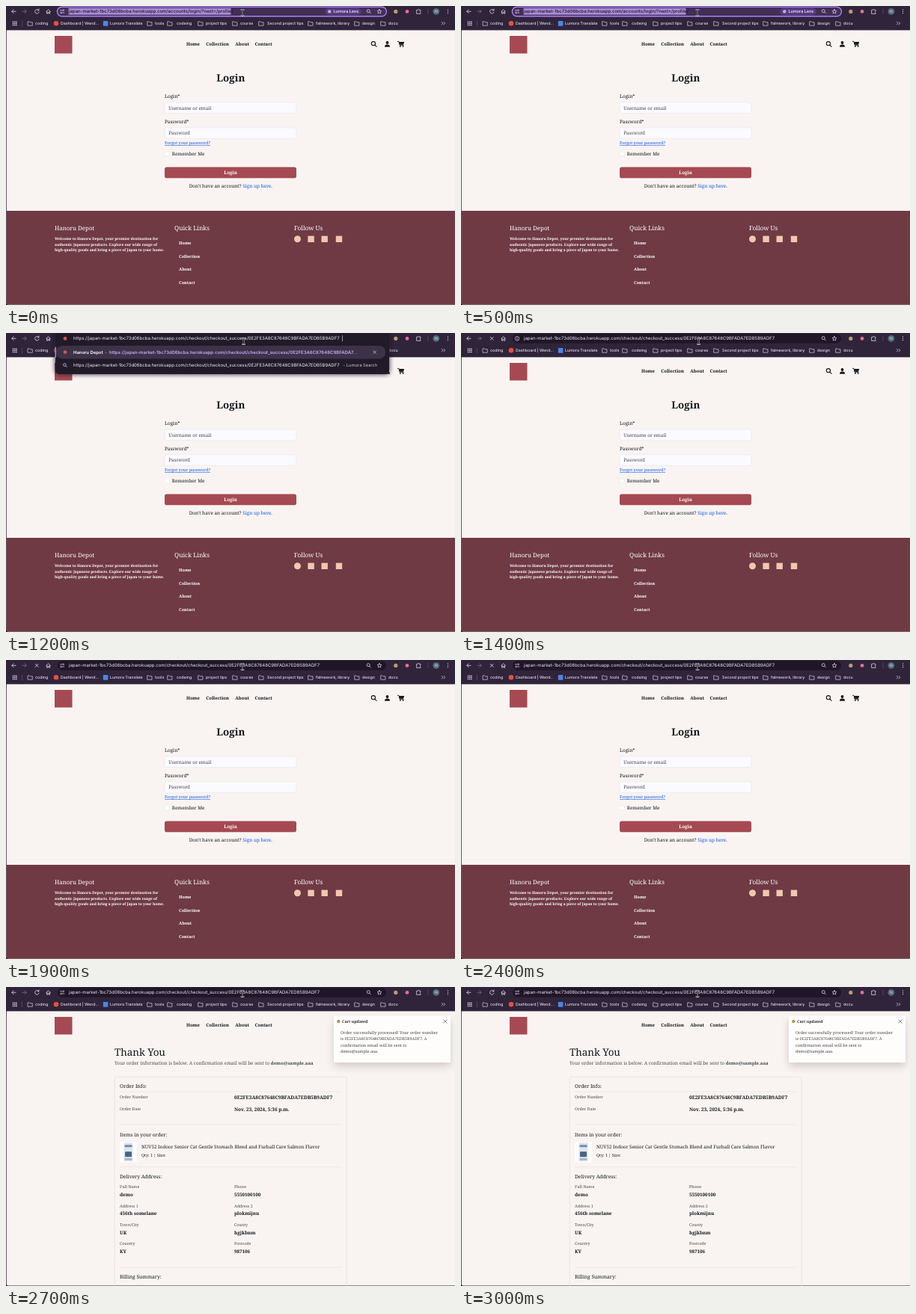
Animation, 600 px wide and 400 px high, one loop 3100 ms. Source, as an HTML page:

```html
<!DOCTYPE html>
<html lang="en">
<head>
<meta charset="utf-8">
<title>Shop checkout</title>
<style>
html, body { margin: 0; width: 100%; height: 100%; overflow: hidden; background: #1b1522; }
svg { display: block; width: 600px; height: 400px; text-rendering: geometricPrecision; }
.ui { font-family: Inter, Roboto, sans-serif; }
.serif { font-family: "Noto Serif", "Liberation Serif", serif; }
</style>
</head>
<body>
<svg id="stage" viewBox="0 0 600 400"></svg>
<script>
const LOOP = 3100;
const PASTE = 700, LOAD = 1400, SECURE = 1900, ARRIVE = 2500, DONE = 2700;

const SHOP = "Hanoru Depot";
const ORDER = "0E2FE3A8C87648C9BFADA7EDB5B9ADF7";
const HOST = "japan-market-1bc73d06bcba.herokuapp.com";
const LOGIN_URL = HOST + "/accounts/login/?next=/profile/";
const ORDER_URL = HOST + "/checkout/checkout_success/" + ORDER;
const MAIL = "demo@sample.aaa";

const INK = "#15171a", GREY = "#47484c", PALE = "#e4dcea", PAGE = "#f9f4f2";
const RED = "#a54a52", WINE = "#6f3a44", PEACH = "#efc8ae", LINE = "#e3dddb", LINK = "#0f58ea";

// Markup helpers
const text = (x, y, size, str, fill = INK, more = "") =>
  `<text x="${x}" y="${y}" font-size="${size}" fill="${fill}" ${more}>${str}</text>`;
const rect = (x, y, w, h, fill, r = 0, more = "") =>
  `<rect x="${x}" y="${y}" width="${w}" height="${h}" rx="${r}" fill="${fill}" ${more}/>`;
const dot = (x, y, r, fill, more = "") =>
  `<circle cx="${x}" cy="${y}" r="${r}" fill="${fill}" ${more}/>`;
const stroke = (d, color, w = 0.8, more = "") =>
  `<path d="${d}" fill="none" stroke="${color}" stroke-width="${w}" stroke-linecap="round" stroke-linejoin="round" ${more}/>`;
const shape = (d, fill) => `<path d="${d}" fill="${fill}"/>`;
const rule = (x1, x2, y) => stroke(`M${x1} ${y}H${x2}`, LINE, 0.5);
const group = (id, body, more = "") => `<g id="${id}" ${more}>${body}</g>`;
const BOLD = ' font-weight="700"', SEMI = ' font-weight="600"', MEDIUM = ' font-weight="500"';
const MID = ' text-anchor="middle"', END = ' text-anchor="end"';

const lens = (x, y, r, color, w) =>
  dot(x, y, r, "none", `stroke="${color}" stroke-width="${w}"`) +
  stroke(`M${x + r * 0.75} ${y + r * 0.75}l${r * 0.85} ${r * 0.85}`, color, w);
const cross = (x, y, r, color, w = 0.8) =>
  stroke(`M${x - r} ${y - r}l${2 * r} ${2 * r}M${x + r} ${y - r}l${-2 * r} ${2 * r}`, color, w);

function star(x, y, r) {
  let d = "";
  for (let i = 0; i < 10; i++) {
    const a = i * Math.PI / 5 - Math.PI / 2, q = i % 2 ? r * 0.45 : r;
    d += (i ? "L" : "M") + (x + q * Math.cos(a)).toFixed(2) + " " + (y + q * Math.sin(a)).toFixed(2);
  }
  return stroke(d + "Z", PALE, 0.7);
}

function folder(x, label, labelX) {
  return stroke(`M${x - 2.9} 20.9h2l.9 .9h3v4.4h-5.9z`, PALE, 0.65) +
    text(labelX, 25.1, 5.25, label, PALE, MEDIUM);
}

function browser() {
  let apps = "";
  for (let i = 0; i < 9; i++)
    apps += rect(8.8 + (i % 3) * 2.2, 20.4 + Math.floor(i / 3) * 2.2, 1.4, 1.4, PALE, 0.2);
  const folders = [
    [32.3, "coding", 39], [192, "tools", 199], [219, "codeing", 228],
    [260, "project tips", 267], [306, "course", 313], [341, "Second project tips", 349],
    [407, "falmework, library", 414], [469, "design", 476], [504, "docu", 511]
  ];
  return rect(0, 0, 600, 32.4, "#30243b") +
    stroke("M13 7.3h-5.2M10.2 4.9l-2.4 2.4l2.4 2.4", PALE) +
    stroke("M22 7.3h5.2M24.8 4.9l2.4 2.4l-2.4 2.4", "#7d7187") +
    stroke("M53.8 7.4l2.8-2.6l2.8 2.6M54.6 7v3.2h1.3v-2h1.4v2h1.3v-3.2", PALE, 0.75) +
    rect(69, 1, 439, 12.8, "#1f1728", 6.4) +
    dot(520.8, 7.4, 2.6, "#b79d6e") + dot(536, 7.4, 2.4, "#ee6a9a") +
    stroke("M549 5.4h1.4a1 1 0 0 1 2 0h1.6v1.7a1 1 0 0 0 0 1.9v1.4h-5z", PALE, 0.75) +
    stroke("M564 4.2v6.4", "#6b5b78", 0.6) +
    dot(574.8, 7.3, 4.4, "#536e7a") + text(574.8, 9.3, 5, "N", "#eee", MID) +
    [4.9, 7.3, 9.7].map(y => dot(590.5, y, 0.6, PALE)).join("") +
    apps + stroke("M21.4 20v7", "#6b5b78", 0.6) +
    folders.map(f => folder(...f)).join("") +
    dot(67, 23.3, 3.3, "#e5513f") + text(73, 25.1, 5.25, "Dashboard | Wend...", PALE, MEDIUM) +
    rect(129.8, 20.1, 6.6, 6.6, "#4a86e8", 0.8) + text(139, 25.1, 5.25, "Lumora Translate", PALE, MEDIUM) +
    stroke("M582.2 21.4l1.8 1.8l-1.8 1.8M585 21.4l1.8 1.8l-1.8 1.8", PALE, 0.7);
}

const reloadIcon = stroke("M43.6 5.5a2.8 2.8 0 1 0 .5 2.7M44 4v1.9h-1.9", PALE);
const tuneIcon = stroke("M72.4 5.8h2.4M77.8 9h-2.4", PALE, 0.7) +
  dot(76.6, 5.8, 0.9, "none", `stroke="${PALE}" stroke-width=".7"`) +
  dot(73.6, 9, 0.9, "none", `stroke="${PALE}" stroke-width=".7"`);
const infoIcon = dot(75, 7.4, 2.8, "none", `stroke="${PALE}" stroke-width=".7"`) +
  stroke("M75 7.2v1.6M75 5.9v.1", PALE, 0.7);
const barTools = lens(484.2, 6.7, 2, PALE, 0.75) + star(499, 7.5, 3.1);

const editing =
  rect(68.4, 1.2, 440, 12.6, "#412f58", 6.3, 'stroke="#b07fee" stroke-width="1.4"') +
  rect(83.5, 2.9, 217, 8.8, "#a98bd6") +
  text(84, 9.4, 6, LOGIN_URL, "#1c1426", MEDIUM) +
  rect(426.5, 2.5, 48, 9.8, "#573c80", 4.9) + dot(432.3, 7.4, 2.2, "#c8aaf2") +
  text(437.5, 9.3, 5.45, "Lumora Lens", "#eadcff", SEMI);

const suggestions =
  rect(66, -6, 446, 61, "#1d1725", 5, 'filter="url(#soft)"') +
  rect(66, -6, 446, 61, "#211a29", 5) +
  rect(67, 17, 440, 17.4, "#3d3348", 8) + rect(65.6, 18.5, 1.4, 14.5, "#b48cf0", 0.6) +
  dot(79, 7.4, 2.4, "#d9534f") + dot(79, 25.6, 2.4, "#d9534f") +
  text(90, 9.4, 6, "https://" + ORDER_URL, "#f1ebf5") +
  rect(449.3, 3.2, 0.6, 8, "#f1ebf5") +
  text(90, 27.8, 5.9, SHOP, "#fff", SEMI) + text(132.2, 27.8, 5.9, "-", "#c9b8dc") +
  text(138, 27.8, 6, "https://" + ORDER_URL.slice(0, -10) + "...", "#c9a8fa", SEMI) +
  cross(492.6, 25.6, 1.8, PALE, 0.7) +
  lens(78.4, 42.6, 1.8, PALE, 0.7) +
  text(90, 45.3, 6, "https://" + ORDER_URL, "#f1ebf5") +
  text(450.5, 45.3, 5.8, "- Lumora Search", "#cfc5d8");

const visiting = text(84, 9.4, 6, ORDER_URL, "#ece5f1") + barTools;

function nav(x, y) {
  return [[0, "Home"], [26.3, "Collection"], [65.3, "About"], [91.5, "Contact"]]
    .map(([dx, s]) => text(x + dx, y, 6, s, INK, SEMI)).join("");
}

const header = rect(65, 40, 23.5, 23.5, RED) + nav(241, 53.2) +
  lens(490.9, 50.2, 2.6, INK, 1.1) +
  dot(509.5, 49, 1.9, INK) + shape("M506 54.8a3.5 3.3 0 0 1 7 0z", INK) +
  stroke("M523.4 47.4h1.5l1.3 5h4.9", INK, 0.9) +
  shape("M525 48h7.2l-1.2 3.7h-5.1z", INK) +
  dot(526.9, 54, 0.9, INK) + dot(530.6, 54, 0.9, INK);

function field(y, label, hint) {
  return text(212, y - 5.6, 6.4, label) +
    rect(212, y, 176, 14.6, "#fbfaff", 2.2, 'stroke="#dee2e6" stroke-width=".5"') +
    text(217.2, y + 9.5, 6.27, hint, "#43474d");
}

const loginPage =
  text(300.3, 101, 13.4, "Login", INK, BOLD + MID) +
  field(129, "Login*", "Username or email") + field(162.8, "Password*", "Password") +
  text(212, 185, 5.6, "Forgot your password?", LINK, 'text-decoration="underline"') +
  rect(212.2, 195, 5.8, 5.8, "#fff", 1.2, 'stroke="#dee2e6" stroke-width=".5"') +
  text(221.8, 200.1, 6.25, "Remember Me") +
  rect(212, 215.6, 176, 14.6, RED, 2.8) +
  text(300, 225.1, 6.2, "Login", "#fff", SEMI + MID) +
  text(300.3, 242.9, 6.35, `Don't have an account? <tspan fill="${LINK}">Sign up here</tspan>.`, INK, MID) +
  rect(0.7, 274, 600, 125.4, WINE) +
  text(65, 299.6, 7.9, SHOP, "#fff", MEDIUM) + text(225, 299.6, 8.3, "Quick Links", "#fff", MEDIUM) +
  text(385, 299.6, 8.3, "Follow Us", "#fff", MEDIUM) +
  [`Welcome to ${SHOP}, your premier destination for`,
   "authentic Japanese products. Explore our wide range of",
   "high-quality goods and bring a piece of Japan to your home."]
    .map((s, i) => text(65, 313.4 + i * 7.5, 4.87, s, "#fff", SEMI)).join("") +
  ["Home", "Collection", "About", "Contact"]
    .map((s, i) => text(231, 318.8 + i * 17.75, 5.5, s, "#fff", SEMI)).join("") +
  dot(389.5, 311.8, 4.5, PEACH) + rect(403.4, 307.6, 8.4, 8.4, PEACH) +
  rect(421.5, 307.6, 8.4, 8.4, PEACH) + rect(440.8, 307.6, 8.4, 8.4, PEACH);

function pair(y, left, right, gap = 10.6) {
  return [[152, left], [305, right]].map(([x, [label, value]]) =>
    text(x, y, 5.35, label, GREY) + text(x, y + gap, 6.3, value, INK, BOLD)).join("");
}

const orderPage =
  text(145, 78.4, 13.4, "Thank You", INK, MEDIUM) +
  text(145, 91.3, 6.3, `Your order information is below. A confirmation email will be sent to <tspan font-weight="700" font-size="6">${MAIL}</tspan>`, GREY) +
  rect(145.2, 107, 310, 320, "none", 3, 'stroke="#e3dddb" stroke-width=".7"') +
  text(152, 121.8, 6.75, "Order Info:") + rule(152, 448, 126.8) +
  text(152, 136, 5.35, "Order Number", GREY) + text(305, 137, 6.5, ORDER, INK, BOLD) +
  text(152, 151.7, 5.35, "Order Date", GREY) +
  text(305, 152.7, 6.45, "Nov. 23, 2024, 5:36 p.m.", INK, BOLD) + rule(152, 448, 170.8) +
  text(152, 186.6, 6.6, "Items in your order:") +
  rect(152, 194, 23, 27, "#fdfdfd") +
  rect(157.5, 195, 12, 25, "#dfe6ee", 1.2) + rect(158.5, 198, 10, 3, "#6f8cb0", 0.8) +
  rect(159, 207, 9, 7, "#4a6487", 0.8) + rect(158.5, 216, 10, 2.5, "#9fb4c8", 0.6) +
  text(181, 203.2, 6.25, "NUV52 Indoor Senior Cat Gentle Stomach Blend and Furball Care Salmon Flavor") +
  text(181, 213.4, 5.4, "Qty: 1 | Size:") + rule(152, 448, 227.5) +
  text(152, 242.8, 6.7, "Delivery Address:") +
  pair(256.2, ["Full Name", "demo"], ["Phone", "5550100100"]) +
  pair(281.6, ["Address 1", "456th somelane"], ["Address 2", "plokmijnu"]) +
  pair(306.8, ["Town/City", "UK"], ["County", "hgjkbnm"]) +
  pair(332, ["Country", "KY"], ["Postcode", "987106"]) +
  rule(152, 448, 361.8) +
  text(152, 376.6, 6.7, "Billing Summary:") +
  text(158, 397.5, 6.3, "Order Total", GREY) +
  text(442.5, 397.5, 6.3, "£24.99", INK, BOLD + END);

const toast =
  rect(438, 44, 156, 62, "#7d7073", 2, 'filter="url(#wide)" opacity=".32"') +
  rect(438, 38.5, 156, 62.5, "#fffdfc", 1) +
  dot(444.4, 46, 2.2, "#b9974f") +
  text(449, 47.8, 5.2, "Cart updated", "#2a2b2e", BOLD) + cross(587, 46, 2.3, "#55565a", 0.7) +
  ["Order successfully processed! Your order number", `is ${ORDER}. A`,
   "confirmation email will be sent to", MAIL + "."]
    .map((s, i) => text(447, 63 + i * 8.25, i === 1 ? 5.3 : 5.5, s, GREY)).join("");

const beam = "M-1.6 -4q1.6 0 1.6 1.2v5.6q0 1.2 -1.6 1.2M1.6 -4q-1.6 0 -1.6 1.2v5.6q0 1.2 1.6 1.2";
const blur = (id, size) =>
  `<filter id="${id}" x="-20%" y="-50%" width="140%" height="200%"><feGaussianBlur stdDeviation="${size}"/></filter>`;

document.getElementById("stage").innerHTML =
  `<defs>${blur("soft", 3)}${blur("wide", 5.5)}</defs>` +
  rect(0, 0, 600, 400, "#1b1522") + rect(0.7, 28, 602, 371.4, PAGE, 2) +
  group("pages",
    group("login", loginPage) + group("order", orderPage) +
    group("header", header) + group("plainNav", nav(252.8, 46.7)) + group("toast", toast),
    'class="serif"') +
  group("chrome",
    browser() + group("reload", reloadIcon) + group("stop", cross(41.2, 7.3, 2, PALE)) +
    group("editing", editing + barTools) + group("visiting", visiting) +
    group("tune", tuneIcon) + group("info", infoIcon) + group("suggest", suggestions),
    'class="ui"') +
  group("cursor", stroke(beam, "#fff", 1.7) + stroke(beam, "#111", 0.8));

const parts = {};
document.querySelectorAll("g[id]").forEach(g => parts[g.id] = g);

function show(id, on) {
  parts[id].style.display = on ? "" : "none";
}

function render(t) {
  const pasted = t >= PASTE && t < LOAD;
  const arrived = t >= ARRIVE, done = t >= DONE;
  const loading = t >= LOAD && !done;
  show("login", !arrived);
  show("order", arrived);
  show("header", !arrived || done);
  show("plainNav", arrived && !done);
  show("toast", done);
  show("reload", !loading);
  show("stop", loading);
  show("editing", t < PASTE);
  show("suggest", pasted);
  show("visiting", t >= LOAD);
  show("info", t >= LOAD && t < SECURE);
  show("tune", t < PASTE || t >= SECURE);
  parts.order.setAttribute("transform", `translate(0 ${done ? 13.2 : 0})`);
  const low = t >= PASTE && t < SECURE;
  parts.cursor.setAttribute("transform", low ? "translate(317.6 11)" : "translate(316 9)");
}

function tick() {
  render(performance.now() % LOOP);
  requestAnimationFrame(tick);
}
tick();
</script>
</body>
</html>
```
